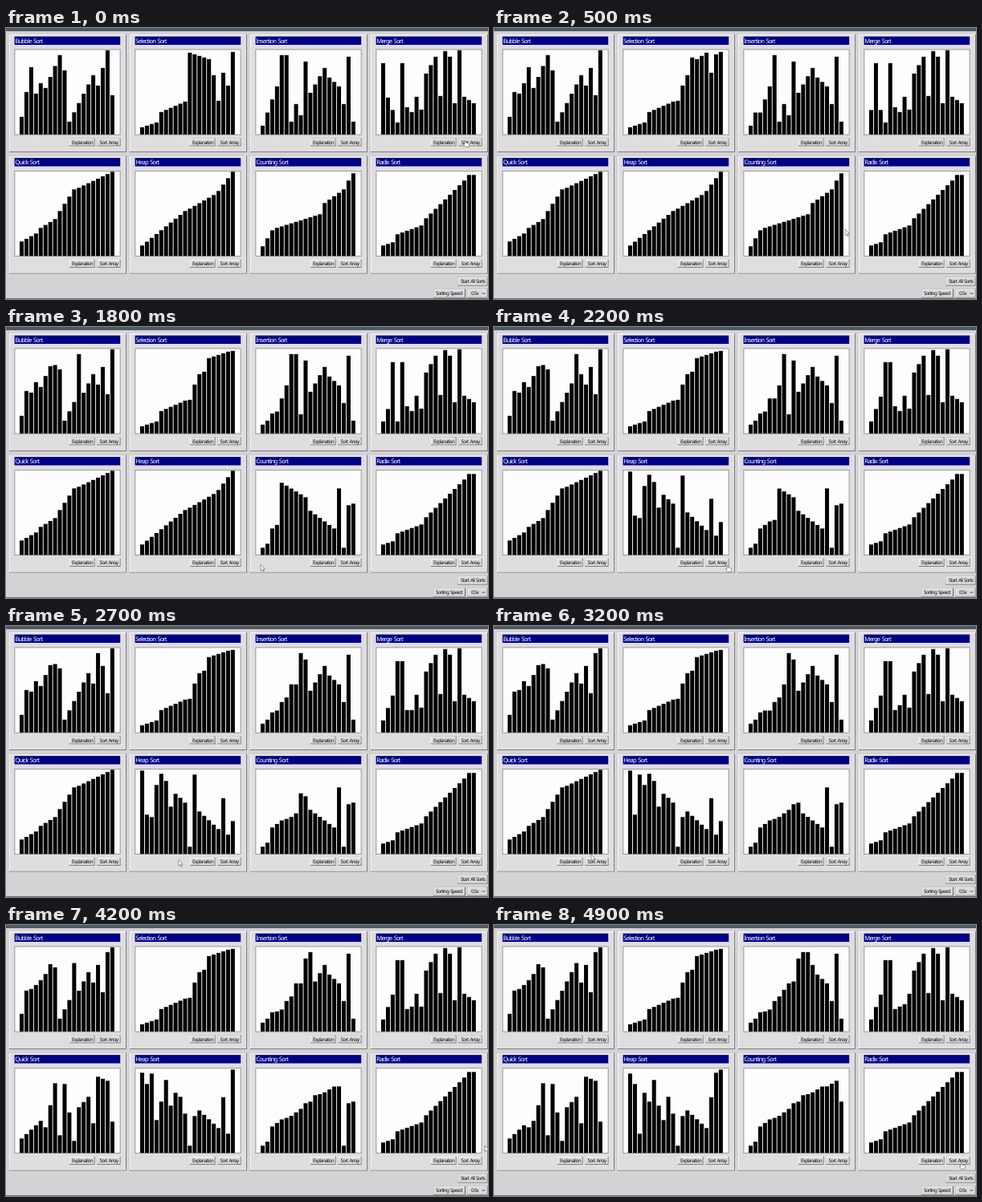
An HTML page that plays this animation: 600x338 px, repeating every 5 s.

```html
<!DOCTYPE html>
<html lang="en">
<head>
<meta charset="utf-8">
<title>Sorting panels</title>
<style>
  html, body { margin: 0; width: 100%; height: 100%; overflow: hidden; background: #d5d2d5; }
  svg { display: block; width: 100vw; height: 100vh; }
  text { font-family: "Noto Sans", "Open Sans", sans-serif; text-rendering: geometricPrecision; }
  .title { font-size: 7.7px; letter-spacing: -.89px; word-spacing: 1.3px; fill: #fff; }
  .label { font-size: 6.2px; letter-spacing: -.74px; word-spacing: 1.1px; fill: #111; }
</style>
</head>
<body>
<svg id="stage" viewBox="0 0 600 338" preserveAspectRatio="none"></svg>
<script>
const LOOP = 5000, FRAME = 100, FIRST = 60, STEP = 205, COUNT = 20;
const stage = document.getElementById('stage');

function add(tag, attrs, parent = stage) {
  const el = document.createElementNS('http://www.w3.org/2000/svg', tag);
  for (const key in attrs) el.setAttribute(key, attrs[key]);
  return parent.appendChild(el);
}
const box = (x, y, width, height, fill, parent) => add('rect', { x, y, width, height, fill }, parent);

function write(x, y, cls, string, parent) {
  add('text', { x, y, class: cls }, parent).textContent = string;
}

function raised(x, y, w, h, dark, face, parent) {
  box(x, y, w, h, dark, parent);
  box(x, y, w - 1, h - 1, '#f6f5f6', parent);
  box(x + 1, y + 1, w - 2, h - 2, face, parent);
}

function button(x, y, w, h, string, inset, parent) {
  raised(x, y, w, h, '#686868', '#dcd9dc', parent);
  write(x + inset, y + h / 2 + 2.2, 'label', string, parent);
}

const swap = (a, i, j) => { [a[i], a[j]] = [a[j], a[i]]; };

// Joins single heights and straight runs given as [length, first, last].
const runs = (...parts) => parts.flatMap(part => {
  if (!Array.isArray(part)) return part;
  const [length, first, last] = part;
  return Array.from({ length }, (_, i) => first + (last - first) * i / (length - 1));
});

// Each sorter pauses after every visible change.
function* bubble(a) {
  let start = COUNT - 2;
  for (let end = COUNT - 1; end > 0; end--) {
    for (let j = start; j < end; j++)
      if (a[j] > a[j + 1]) { swap(a, j, j + 1); yield; }
    start = 0;
  }
}

function* selection(a) {
  for (let i = 0; i < COUNT; i++) {
    let min = i;
    for (let j = i + 1; j < COUNT; j++) if (a[j] < a[min]) min = j;
    if (min !== i) { swap(a, i, min); yield; }
  }
}

// Starts in the middle of placing the sixth bar.
function* insertion(a) {
  let key = 25, j = 3;
  for (let i = 5; i < COUNT; i++) {
    if (i > 5) { key = a[i]; j = i - 1; }
    for (; j >= 0 && a[j] > key; j--) { a[j + 1] = a[j]; yield; }
    a[j + 1] = key;
  }
}

function* merge(a, from = 0, to = COUNT - 1) {
  if (from >= to) return;
  const mid = (from + to) >> 1;
  yield* merge(a, from, mid);
  yield* merge(a, mid + 1, to);
  const merged = a.slice(from, to + 1).sort((p, q) => p - q);
  for (let i = from; i <= to; i++) { a[i] = merged[i - from]; yield; }
}

function* counting(a) {
  const sorted = [...a].sort((p, q) => p - q);
  for (let i = 0; i < COUNT; i++) { a[i] = sorted[i]; yield; }
}

function* heap(a) {
  function* sift(i, size) {
    for (;;) {
      let top = i;
      for (const c of [2 * i + 1, 2 * i + 2]) if (c < size && a[c] > a[top]) top = c;
      if (top === i) return;
      swap(a, i, top); yield;
      i = top;
    }
  }
  for (let i = COUNT / 2 - 1; i >= 0; i--) yield* sift(i, COUNT);
  for (let end = COUNT - 1; end > 0; end--) {
    swap(a, 0, end); yield;
    yield* sift(0, end);
  }
}

function* quick(a, from = 0, to = COUNT - 1) {
  if (from >= to) return;
  let edge = from;
  for (let j = from; j <= to; j++) {
    if (a[j] > a[to]) continue;
    if (j !== edge) { swap(a, edge, j); yield; }
    edge++;
  }
  yield* quick(a, from, edge - 2);
  yield* quick(a, edge, to);
}

// "reset" is when the bars are shuffled, "from" the tick of the first change after it.
const panels = [
  { name: 'Bubble Sort', sort: bubble,
    bars: runs([3, 22, 84], [2, 51, 64], [4, 58, 99], 80, [6, 16, 74], [3, 61, 105], 49) },
  { name: 'Selection Sort', sort: selection,
    bars: runs([4, 9, 15], [6, 28, 41], [5, 102, 94], [2, 74, 42], [2, 77, 61], 103) },
  { name: 'Insertion Sort', sort: insertion,
    bars: runs([4, 11, 60], 99, 99, 16, 38, 24, 91, [4, 52, 83], [3, 71, 60], 38, 97, 16) },
  { name: 'Merge Sort', sort: merge,
    bars: runs(89, [3, 46, 15], 89, 34, 28, 47, 31, [3, 76, 97], 48, [2, 104, 97], 39, 105, [3, 47, 39]) },
  { name: 'Quick Sort', sort: quick, reset: 3700, from: 24,
    before: runs([4, 18, 28], [4, 35, 46], [4, 56, 83], [8, 85, 105]),
    bars: runs([5, 18, 40], [3, 32, 87], 22, [3, 86, 15], [3, 57, 70], 37, [3, 95, 90], 39) },
  { name: 'Heap Sort', sort: heap, reset: 2100, from: 13,
    before: runs([10, 13, 56], [6, 59, 76], [4, 81, 105]),
    bars: runs(104, [2, 49, 46], 86, [2, 100, 91], 59, [3, 75, 64], 9, 99, [5, 53, 31], 70, [2, 24, 41]) },
  { name: 'Counting Sort', sort: counting, reset: 1000, from: 6,
    before: runs([3, 12, 32], [10, 35, 52], [5, 66, 83], [2, 94, 103]),
    bars: runs([4, 14, 103], [6, 90, 72], [6, 55, 33], 83, 9, [2, 62, 64]) },
  { name: 'Radix Sort', bars: runs([3, 13, 17], [6, 27, 38], [9, 47, 94], 101, 101) }
];

function history(panel) {
  const a = [...panel.bars], states = [[...a]];
  if (panel.sort) for (const _ of panel.sort(a)) states.push([...a]);
  return states;
}

box(0, 0, 600, 338, '#d5d2d5');
box(0, 0, 600, 4, '#4c5962');
box(0, 337, 600, 1, '#6c6a6c');

panels.forEach((panel, n) => {
  const g = add('g', { transform: `translate(${n % 4 * 150} ${n > 3 ? 151.5 : 0})` });
  raised(4, 8, 146, 147, '#7f7d7f', '#e0dde0', g);
  box(10.6, 10.6, 131.6, 10.4, '#000084', g);
  write(11.3, 18.7, 'title', panel.name, g);
  box(10.5, 26.5, 132, 107, '#858385', g);
  box(11.3, 27.3, 130.4, 105.4, '#fefdfe', g);
  panel.rects = panel.bars.map((_, i) => box(17 + i * 5.94, 0, 5, 0, '#000', g));
  button(79, 137.5, 31.5, 9.8, 'Explanation', 3, g);
  button(113.5, 137.5, 29, 9.8, 'Sort Array', 3, g);
  panel.states = history(panel);
});

button(562.5, 310.5, 37, 11, 'Start All Sorts', 3.5);
button(532.5, 325.5, 39.5, 11, 'Sorting Speed:', 2.5);
button(574.5, 325.5, 25, 11, '0.5x', 4.5);
add('path', { d: 'M592.5 330l2 2 2-2', fill: 'none', stroke: '#222', 'stroke-width': .8 });

const shape = { fill: '#fff', stroke: '#555', 'stroke-width': .6, 'stroke-linejoin': 'round' };
const arrow = add('path', { ...shape, d: 'M0 0V7.5L1.8 6L3 8.7L4.2 8.2L3 5.5H5.3Z' });
const hand = add('path', { ...shape,
  d: 'M0 .5Q.8-.5 1.5.5V3L5 3.8Q5.8 4.2 5.5 6L4.8 8.5H1L-1.5 5.2Q-1.5 4 0 5Z' });

// Stops of the pointer: arrival, departure, x, y, over a button
const stops = [
  [0, 0, 571, 140, true], [500, 500, 437, 251, false], [900, 1400, 425, 294, true],
  [1900, 2300, 290, 297, true], [3200, 3200, 121, 285, false], [3400, 3800, 126, 294, true],
  [4200, 4200, 596, 275, false], [4600, LOOP, 581, 296, true]
];

function moveCursor(t) {
  const k = stops.findLastIndex(stop => t >= stop[0]);
  const [, leave, x, y, hover] = stops[k];
  const [arrive, , nextX, nextY] = stops[k + 1] || stops[k];
  const moving = t > leave;
  const u = moving ? (t - leave) / (arrive - leave) : 0;
  const at = `translate(${x + (nextX - x) * u} ${y + (nextY - y) * u})`;
  const pointing = hover && !moving;
  for (const [el, on] of [[arrow, !pointing], [hand, pointing]]) {
    el.setAttribute('transform', at);
    el.setAttribute('visibility', on ? 'visible' : 'hidden');
  }
}

function draw(t) {
  const ticks = Math.max(0, Math.floor((t - FIRST) / STEP) + 1);
  for (const { states, rects, before, reset = 0, from = 1 } of panels) {
    const done = Math.min(Math.max(0, ticks - from + 1), states.length - 1);
    const bars = t < reset ? before : states[done];
    rects.forEach((rect, i) => {
      rect.setAttribute('y', 132.8 - bars[i]);
      rect.setAttribute('height', bars[i]);
    });
  }
  moveCursor(t);
}

const begin = performance.now();
function tick() {
  draw(Math.floor((performance.now() - begin) % LOOP / FRAME) * FRAME);
  requestAnimationFrame(tick);
}
tick();
</script>
</body>
</html>
```
